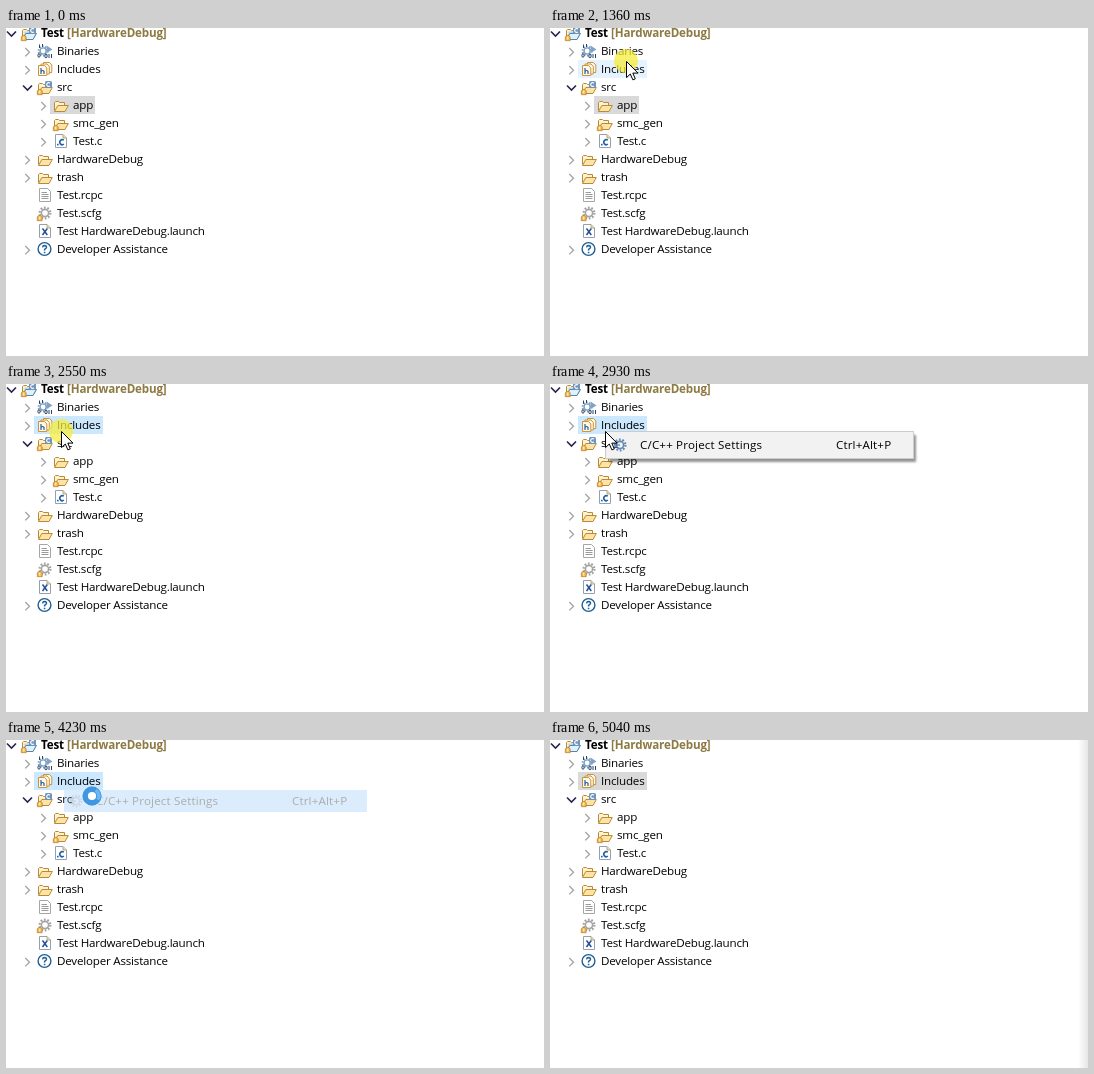
An HTML page for the animation above (6.46 s loop, 538 by 328 pixels).

```html
<!DOCTYPE html>
<html lang="en">
<head>
<meta charset="utf-8">
<title>Project tree</title>
<style>
  html, body { margin: 0; width: 100%; height: 100%; overflow: hidden; background: #fff; }
  svg { display: block; width: 538px; height: 328px; }
  text { font: 11.6px "Open Sans", "Noto Sans", sans-serif; letter-spacing: -.2px; fill: #000; }
  .bold { font-weight: 700; letter-spacing: -.14px; }
  .note { fill: #8c7a42; }
  .menu text { letter-spacing: .16px; }
  .chev { fill: none; stroke: #a3a3a3; stroke-width: 1.3; }
  .chev.open { stroke: #2f2150; stroke-width: 1.6; }
  .chev.hot { stroke: #a5dcf6; }
  .crisp { shape-rendering: crispEdges; }
</style>
</head>
<body>
<svg viewBox="0 0 538 328" xmlns="http://www.w3.org/2000/svg">
  <defs>
    <linearGradient id="edge">
      <stop offset="0" stop-color="#fff"/>
      <stop offset="1" stop-color="#e6e6e6"/>
    </linearGradient>
    <filter id="blur" x="-5%" y="-30%" width="110%" height="160%"><feGaussianBlur stdDeviation="1.2"/></filter>

    <g id="folder" stroke="#b98a35" stroke-linejoin="round">
      <path d="M1.5 13.5V5.5L2.5 4.5H5.5L6.5 5.5H11.5V8.5" fill="#fdf3d2"/>
      <path d="M1.5 14.5L4.8 8.5H15.3L12 14.5Z" fill="#fde3a6"/>
    </g>
    <g id="badge">
      <path d="M.3 15.7V12L1.6 10.4H3.8L5.2 12V15.7Z" fill="#f0b84a" stroke="#b97a24" stroke-width=".7"/>
      <path d="M2.8 11.6V14.6" stroke="#fff" stroke-width=".9"/>
    </g>
    <g id="cmark">
      <rect x="8" y="2" width="7" height="7" rx="1.5" fill="#6f94bd"/>
      <path d="M13 4.2A1.9 1.9 0 1 0 13 6.8" fill="none" stroke="#fff" stroke-width="1.1"/>
    </g>
    <g id="page">
      <path d="M2.5 1.5H10L13.5 5V14.5H2.5Z" fill="#fff" stroke="#93a0b3"/>
      <path d="M10 1.5V5H13.5" fill="#e7d9b0" stroke="#b79a5c" stroke-width=".8"/>
    </g>
    <g id="gear" fill="none">
      <circle r="5.4" stroke="currentColor" stroke-width="2.2" stroke-dasharray="1.7 1.69"/>
      <circle r="3.6" stroke="currentColor" stroke-width="1.6"/>
    </g>

    <g id="project">
      <use href="#folder"/>
      <path d="M3.5 6.5H11.5V9H3.5Z" fill="#b9d6ec"/>
      <path d="M1.5 14.5L4.8 8.5H15.3L12 14.5Z" fill="#e2f0fa" stroke="#4b87b8"/>
      <use href="#cmark"/><use href="#badge"/>
    </g>
    <g id="binaries">
      <use href="#gear" x="6" y="8" color="#7d9dc0" transform="translate(1 1.2) scale(.85)"/>
      <path d="M9.5 2.5L15.5 6.5L9.5 10Z" fill="#7fa3c8"/>
      <g fill="none" stroke="#25466e">
        <path d="M2.5 1.5V5M12 11V15M14.5 11V15M5.5 1V4"/>
        <ellipse cx="9" cy="13" rx="1.2" ry="1.8"/>
        <ellipse cx="2" cy="12.5" rx="1.1" ry="1.8"/>
      </g>
    </g>
    <g id="includes" fill="#fff8e4" stroke="#c69443">
      <path d="M6.5 1.5H12.5L14.8 4V11.5H6.5Z"/>
      <path d="M4 3H10L12.3 5.5V13H4Z"/>
      <path d="M1.5 4.5H7.5L9.8 7V14.5H1.5Z"/>
      <path d="M4 7V13M4 10.5Q5.7 8.6 7 10.3V13" fill="none" stroke="#2c5f9e" stroke-width="1.2"/>
    </g>
    <g id="srcfolder"><use href="#folder"/><use href="#cmark"/><use href="#badge"/></g>
    <g id="genfolder"><use href="#folder"/><use href="#badge"/></g>
    <g id="cfile">
      <use href="#page"/>
      <path d="M10.8 7.2A2.5 2.5 0 1 0 10.8 11.2" fill="none" stroke="#1f5fa8" stroke-width="1.6"/>
      <rect x="4" y="10.8" width="1.6" height="1.6" fill="#1f5fa8"/>
    </g>
    <g id="textfile">
      <path d="M2.5 1.5H10.5L13.5 4.5V14.5H2.5Z" fill="#fff" stroke="#a6a6a6"/>
      <path d="M4.5 5.5H10M4.5 7.5H11.5M4.5 9.5H11.5M4.5 11.5H11.5" stroke="#9b9b9b"/>
    </g>
    <g id="config">
      <use href="#gear" x="8" y="8" color="#a2a2a2"/>
      <use href="#badge"/>
    </g>
    <g id="launch">
      <use href="#page"/>
      <path d="M5.5 5.5L10.3 12M10.3 5.5L5.5 12" stroke="#24509a" stroke-width="1.5"/>
    </g>
    <g id="help" fill="none" stroke="#1f5f95">
      <circle cx="7.5" cy="8" r="6.4" fill="#fff" stroke-width="1.4"/>
      <path d="M5.6 6.4Q5.8 4.6 7.6 4.6Q9.6 4.7 9.5 6.4Q9.3 7.5 7.6 8.4V9.6M7.6 10.7V12.2" stroke-width="1.5"/>
    </g>
  </defs>

  <rect width="538" height="328" fill="#fff"/>
  <rect id="shade" x="528" width="10" height="328" fill="url(#edge)"/>
  <rect id="hover" class="crisp" height="18" fill="#e5f3ff"/>
  <rect id="chosen" class="crisp" height="18"/>
  <g id="tree"></g>

  <g id="menu" class="menu">
    <g id="frame">
      <rect x="59" y="51" width="307" height="27" fill="#000" opacity=".42" filter="url(#blur)"/>
      <rect x="55.5" y="47.5" width="308" height="27" fill="#f2f2f2" stroke="#ccc"/>
    </g>
    <rect id="item" class="crisp" x="58" y="50" width="303" height="22" fill="#91c9f7"/>
    <use href="#gear" x="70" y="61" color="#5f87b3"/>
    <path d="M63 58.5H68M64 61H70M63 63.5H68" stroke="#2f5c8c"/>
    <text x="90" y="65">C/C++ Project Settings</text>
    <text x="286" y="65">Ctrl+Alt+P</text>
  </g>

  <g id="pointer">
    <circle id="halo" r="12" fill="#f5ec3c" opacity=".74"/>
    <path id="arrow" d="M.5 .5V16.6L4.3 13L6.9 18.9L9.3 17.9L6.8 12.1H12Z" fill="#fff" stroke="#000"/>
    <g id="busy">
      <circle r="10.2" fill="#fff" opacity=".6"/>
      <circle r="6.9" fill="#fff" stroke="#3f97e3" stroke-width="5.6"/>
      <path id="arc" d="M0 -6.9A6.9 6.9 0 0 1 6.9 0" fill="none" stroke="#6fb6f0" stroke-width="3.5"/>
    </g>
  </g>
</svg>

<script>
const LOOP = 6460;
const $ = id => document.getElementById(id);

// depth, icon, label, right end of label, state of the arrow
const rows = [
  [0, 'project', 'Test', 161, 'open'],
  [1, 'binaries', 'Binaries', 94, 'shut'],
  [1, 'includes', 'Includes', 97, 'shut'],
  [1, 'srcfolder', 'src', 69, 'open'],
  [2, 'folder', 'app', 89, 'shut'],
  [2, 'genfolder', 'smc_gen', 116, 'shut'],
  [2, 'cfile', 'Test.c', 98, 'shut'],
  [1, 'folder', 'HardwareDebug', 139, 'shut'],
  [1, 'folder', 'trash', 79, 'shut'],
  [1, 'textfile', 'Test.rcpc', 99],
  [1, 'config', 'Test.scfg', 98],
  [1, 'launch', 'Test HardwareDebug.launch', 201],
  [1, 'help', 'Developer Assistance', 164, 'shut']
];
const INCLUDES = 2, APP = 4;
const left = i => 12 + 16 * rows[i][0];
const rowTop = i => 18 * i - 4;

function rowMarkup([depth, icon, label, , state], i) {
  const x = 6 + 16 * depth, y = 5 + 18 * i;
  let s = '';
  if (state === 'open') s += `<path class="chev open" d="M${x - 5} ${y - 1.5}l4.5 4.5l4.5 -4.5"/>`;
  if (state === 'shut') s += `<path id="chev${i}" class="chev" d="M${x - 2.7} ${y - 3}l4.2 4.2l-4.2 4.2"/>`;
  s += `<use href="#${icon}" x="${x + 9}" y="${y - 8}"/>`;
  s += `<text x="${x + 29}" y="${y + 4}"${depth ? '' : ' class="bold"'}>${label}</text>`;
  if (!depth) s += `<text x="61" y="${y + 4}" class="bold note">[HardwareDebug]</text>`;
  return s;
}
$('tree').innerHTML = rows.map(rowMarkup).join('');

// time, x, y of the pointer
const path = [
  [130, 417, 326], [200, 328, 276], [280, 228, 207], [350, 162, 163], [430, 106, 121.6],
  [520, 96, 97], [600, 88, 66], [660, 81, 46], [720, 76, 33],
  [1510, 76, 33], [1630, 22, 46], [2120, 22, 46], [2370, 55, 47],
  [3090, 55, 47], [3250, 85, 54], [3430, 85, 54], [3440, 86, 56],
  [4400, 86, 56], [4520, 118, 90], [4660, 195, 170], [4760, 272, 250],
  [4840, 345, 323], [5020, 345, 323], [5040, 350, 332]
];

function pointerAt(t) {
  const k = path.findIndex(p => p[0] > t);
  if (k < 1) return null;
  const [t0, x0, y0] = path[k - 1], [t1, x1, y1] = path[k];
  const u = (t - t0) / (t1 - t0);
  return [x0 + (x1 - x0) * u, y0 + (y1 - y0) * u];
}

const between = (t, a, b) => t >= a && t < b;
const ramp = (t, a, b) => Math.min(1, Math.max(0, (t - a) / (b - a)));
const show = (id, on) => $(id).setAttribute('display', on ? 'inline' : 'none');
const fade = (id, v) => $(id).setAttribute('opacity', v);

function mark(id, i) {
  show(id, i >= 0);
  if (i < 0) return;
  const r = $(id);
  r.setAttribute('x', left(i));
  r.setAttribute('y', rowTop(i));
  r.setAttribute('width', rows[i][3] - left(i));
}

function draw(t) {
  const p = pointerAt(t);
  const busy = between(t, 4150, 4780);

  mark('chosen', t < 1510 ? APP : INCLUDES);
  $('chosen').setAttribute('fill', between(t, 1510, 4700) ? '#cce8ff' : '#d9d9d9');

  let over = -1;
  if (p && t < 1510) {
    const i = Math.floor((p[1] + 4) / 18);
    if (rows[i] && p[0] >= left(i) && p[0] < rows[i][3]) over = i;
  }
  mark('hover', over);
  $('chev' + INCLUDES).classList.toggle('hot', between(t, 1600, 2180));

  show('menu', between(t, 2700, 4320));
  show('frame', t < 4040);
  show('item', t >= 3110);
  fade('menu', ramp(t, 2680, 2900) * (1 - ramp(t, 4040, 4320)));
  fade('shade', ramp(t, 4700, 4840));

  show('pointer', p);
  if (p) $('pointer').setAttribute('transform', `translate(${p[0]} ${p[1]})`);
  show('halo', [1360, 2550, 3870].some(a => between(t, a, a + 150)));
  show('arrow', !busy);
  show('busy', busy);
  $('arc').setAttribute('transform', `rotate(${(t - 4150) * .4})`);
}

let start;
function tick(now) {
  start ??= now;
  draw((now - start) % LOOP);
  requestAnimationFrame(tick);
}
draw(0);
requestAnimationFrame(tick);
</script>
</body>
</html>
```
